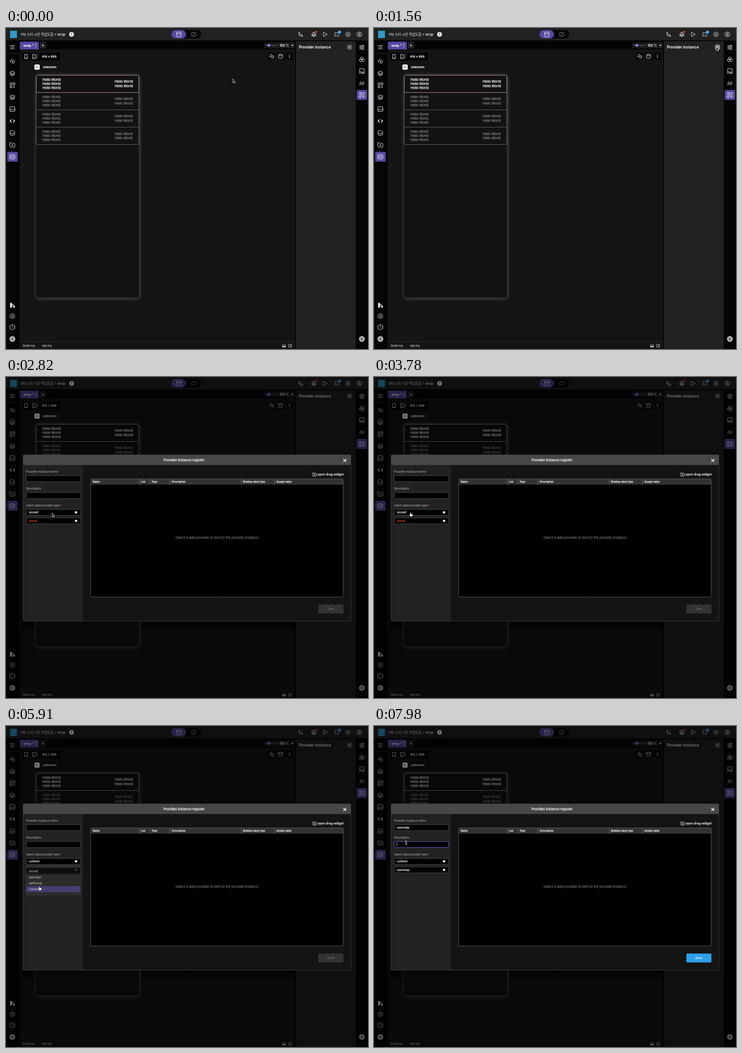
Animation, 795 px wide and 704 px high, one loop 8 s. Source, as an HTML page with a canvas:

```html
<!DOCTYPE html>
<html lang="ko">
<head>
<meta charset="utf-8">
<title>Provider instance register</title>
<style>
html, body { margin: 0; width: 795px; height: 704px; overflow: hidden; background: #141414; }
canvas { display: block; }
</style>
</head>
<body>
<canvas id="stage" width="795" height="704"></canvas>
<script>
const ctx = document.getElementById('stage').getContext('2d');
const LOOP = 8000;
const PURPLE = '#5849a0';
const PROVIDER = 'namutap';

// Eight soft teeth around a small hub
function gearPath() {
  const points = Array.from({ length: 48 }, (_, i) => {
    const angle = i * Math.PI / 24, r = 5.1 + 0.6 * Math.cos(angle * 8);
    return `${(r * Math.cos(angle)).toFixed(2)} ${(r * Math.sin(angle)).toFixed(2)}`;
  });
  return `M${points.join('L')}ZM1.8 0A1.8 1.8 0 1 1-1.8 0A1.8 1.8 0 1 1 1.8 0`;
}

// Icon outlines, centred on 0,0
const ICONS = {
  menu: 'M-5-3.5H5M-5 0H5M-5 3.5H5',
  shapes: 'M-5 1L-1.5-5L2 1ZM2-2A3.3 3.3 0 1 1-1 3',
  layers: 'M0-5L5.5-2L0 1L-5.5-2ZM-5.5 .5L0 3.5L5.5 .5M-5.5 2.7L0 5.7L5.5 2.7',
  widgets: 'M-5-5H-1V-1H-5ZM1.5-5H5.5V-1H1.5ZM-5 1.5H-1V5.5H-5ZM1.5 2H5.5M1.5 5H5.5',
  image: 'M-5.5-3.5Q-5.5-5-4-5H4Q5.5-5 5.5-3.5V3.5Q5.5 5 4 5H-4Q-5.5 5-5.5 3.5ZM-5 4L-1.5 0L1 2L3 0L5.5 3M-3-2.3h1',
  code: 'M-2-3L-5 0L-2 3M2-3L5 0L2 3',
  imageEdit: 'M1-5H-3Q-5-5-5-3V3Q-5 5-3 5H3Q5 5 5 3V0M-4 2L-1 0L2 2L5-1M2-3L3.5-1.5L6-5',
  folder: 'M-5.5-4.5H-2L-.5-3H4Q5.5-3 5.5-1.5V3.5Q5.5 5 4 5H-4Q-5.5 5-5.5 3.5ZM-1.5 0V1L0 2.5L1.5 1V0Z',
  table: 'M-5.5-3Q-5.5-5-3.5-5H3.5Q5.5-5 5.5-3V3Q5.5 5 3.5 5H-3.5Q-5.5 5-5.5 3ZM-5.5-1.5H5.5M-5.5 1.8H5.5M-2-3.2h.5M1.5-3.2h.5M-2 .2h.5M1.5 .2h.5M-2 3.3h.5M1.5 3.3h.5',
  gear: gearPath(),
  alert: 'M0-6L5.3-3V3L0 6L-5.3 3V-3ZM0-3V.7M0 2.3V3',
  sliders: 'M-5.5-3.5H1M4-3.5H5.5M1-3.5a1.5 1.5 0 1 0 3 0a1.5 1.5 0 1 0-3 0M-5.5 0H-4M-1 0H5.5M-4 0a1.5 1.5 0 1 0 3 0a1.5 1.5 0 1 0-3 0M-5.5 3.5H0M3 3.5H5.5M0 3.5a1.5 1.5 0 1 0 3 0a1.5 1.5 0 1 0-3 0',
  rings: 'M-3-2a3 3 0 1 0 6 0a3 3 0 1 0-6 0M-5.5 2a3 3 0 1 0 6 0a3 3 0 1 0-6 0M-.5 2a3 3 0 1 0 6 0a3 3 0 1 0-6 0',
  doc: 'M-5 0V-4Q-5-5.5-3.5-5.5H3.5Q5-5.5 5-4V3.5Q5 5.5 3 5.5M2 5.5V3.5H5',
  server: 'M-5.5-5H5.5V-1H-5.5ZM-3.5-3H0M3-3h.5M0 1.5H-5.5V5.5H0M-3.5 3.5H-1M2.5 5.5V1L1 2.5M4.5 1V5.5L6 4',
  branch: 'M-5-3.5a1.5 1.5 0 1 0 3 0a1.5 1.5 0 1 0-3 0M2 3.5a1.5 1.5 0 1 0 3 0a1.5 1.5 0 1 0-3 0M-3.5-2V1.5Q-3.5 3.5-1.5 3.5H2M-3.5 0H1Q3.5 0 3.5 2',
  bug: 'M-3-1.5Q-3-4 0-4Q3-4 3-1.5V2Q3 5 0 5Q-3 5-3 2ZM-2-6L-1-4M2-6L1-4M-5.5-2L-3-1M5.5-2L3-1M-6 1.2H6M-5.5 5L-3 3M5.5 5L3 3M0-1V5',
  play: 'M-4-5L5 0L-4 5Z',
  cast: 'M-4-2V-4H5V4H2M-5 0Q0 0 0 5M-5 2.5Q-2.5 2.5-2.5 5M-5 5h.3',
  user: 'M-5.5 0a5.5 5.5 0 1 0 11 0a5.5 5.5 0 1 0-11 0M-2-1.2a2 2 0 1 0 4 0a2 2 0 1 0-4 0M-3.7 4Q0 0 3.7 4',
  grid: 'M-5-3.5Q-5-5-3.5-5H3.5Q5-5 5-3.5V3.5Q5 5 3.5 5H-3.5Q-5 5-5 3.5ZM-5-1.5H5M-2.5-3.3h1M1.5-3.3h1M-2 1.7h.7M1.3 1.7h.7',
  link: 'M-1 1.5Q-5 2.5-5-1.5Q-4-5-1-4.5Q2-4 1.5-1M1-1.5Q5-2.5 5 1.5Q4 5 1 4.5Q-2 4-1.5 1M3-5Q5-5 5-3M-3 5Q-5 5-5 3',
  phone: 'M-3-4.5H3V4.5H-3ZM-1 3H1',
  phones: 'M-4.5-4.5H1V4.5H-4.5ZM3-4.5Q5-4.5 5-2V2Q5 4.5 3 4.5M-2.5 3H-1',
  plus: 'M-2 0H2M0-2V2',
  close: 'M-3.3-3.3L3.3 3.3M3.3-3.3L-3.3 3.3',
  expand: 'M-3.5-3H3.5V3H-3.5ZM-1.5 1.2L1.5-1.2M.2-1.2H1.5V0',
  chevron: 'M-1.2-2.5L1.5 0L-1.2 2.5Z',
  shield: 'M-2.5-2.2H2.5V.3Q2.3 1.6 0 2.8Q-2.3 1.6-2.5 .3Z',
  swatch: 'M-5-5H-1V5H-5ZM0-3.5L3-1L0 3ZM1.5 3.2L3.5 1H5.5V5H0Z',
  arrow: 'M0 0V9.2L2.1 7.3L3.5 10.4L5 9.7L3.6 6.7H6.3Z',
  hand: 'M-1 .6Q0-.6 1 .6V3L4.3 3.8Q5.2 4.2 5 5.6L4.3 9H-.4L-3.2 5.8Q-3.3 4.6-1 5.7Z',
  beam: 'M-2-4Q0-4 0-2.5V2.5Q0 4-2 4M2-4Q0-4 0-2.5M0 2.5Q0 4 2 4M-1 1H1'
};
for (const name in ICONS) ICONS[name] = new Path2D(ICONS[name]);

function icon(name, x, y, { stroke = '#eee', fill, width = 1, scale = 1 } = {}) {
  ctx.save();
  ctx.translate(x, y);
  ctx.scale(scale, scale);
  ctx.lineJoin = 'round';
  ctx.lineWidth = width;
  if (fill) { ctx.fillStyle = fill; ctx.fill(ICONS[name]); }
  if (stroke) { ctx.strokeStyle = stroke; ctx.stroke(ICONS[name]); }
  ctx.restore();
}

function box(x, y, w, h, fill, radius = 0, stroke) {
  ctx.beginPath();
  ctx.roundRect(x, y, w, h, radius);
  if (fill) { ctx.fillStyle = fill; ctx.fill(); }
  if (stroke) { ctx.strokeStyle = stroke; ctx.lineWidth = 1; ctx.stroke(); }
}

const dot = (x, y, r, fill) => box(x - r, y - r, r * 2, r * 2, fill, r);

// y is the middle of the capitals
function text(str, x, y, size, weight = 400, color = '#fff', align = 'left') {
  ctx.font = `${weight} ${size}px Inter, "Noto Sans CJK KR", sans-serif`;
  ctx.letterSpacing = `${-0.02 * size}px`;
  ctx.textAlign = align;
  ctx.fillStyle = color;
  ctx.fillText(str, x, y + size * 0.36);
}

const kebab = (x, y) => [-3, 0, 3].forEach(d => dot(x, y + d, 0.9, '#fff'));

function drawTopBar() {
  box(0, 0, 795, 27, '#212121');
  box(9, 6, 15, 16, '#2e9bc9', 1);
  text('HV 소미 시안 작업모음 > wrap', 33, 14, 7.6, 500, '#eee');
  dot(144, 14, 5.2, '#fff');
  text('!', 144, 14, 8, 800, '#222', 'center');
  box(363, 4.5, 65.5, 18.5, '#050505', 9.2);
  box(363, 4.5, 32.5, 18.5, PURPLE, 9.2);
  icon('grid', 379.5, 14);
  icon('link', 412, 14, { stroke: '#999' });
  ['branch', 'bug', 'play', 'cast', 'gear', 'user'].forEach((name, i) =>
    icon(name, [647, 676, 701, 726, 751, 776][i], 14, { scale: 0.95 }));
  dot(681.5, 8.5, 2.3, '#e5392f');
  dot(732.5, 9, 3.6, '#2196f3');
  text('1', 732.5, 9, 5, 600, '#fff', 'center');
}

function drawRails() {
  box(0, 28, 30, 676, '#050505');
  box(0, 0, 1, 704, '#2a2a2a');
  box(0, 55, 28, 1, '#333');
  box(2.8, 271.5, 23, 21.8, PURPLE, 3);
  ['menu', 'shapes', 'layers', 'widgets', 'layers', 'image', 'code', 'imageEdit', 'folder', 'table']
    .forEach((name, i) => icon(name, 14, i ? 47 + i * 26.15 : 42, { width: name === 'code' ? 1.6 : 1 }));
  icon('swatch', 14, 608, { fill: '#eee', stroke: null });
  icon('gear', 14, 632);
  icon('alert', 14, 656);

  box(768, 28, 27, 676, '#050505');
  box(770, 136, 23, 21.8, PURPLE, 3);
  ['sliders', 'rings', 'doc', null, 'server'].forEach((name, i) => name && icon(name, 781.5, 42.5 + i * 26.1));
  text('DS', 775.8, 98.2, 5.5, 700, '#eee');
  text('(x)', 781.5, 120.5, 9, 'italic 500', '#eee', 'center');
  for (const x of [14, 781.5]) {
    dot(x, 682, 6.5, '#aaa');
    icon('chevron', x, 682, { stroke: null, fill: '#111' });
  }
}

function drawPhone() {
  box(62.5, 80, 11.5, 11.5, '#fff', 2.5);
  icon('plus', 68, 85.7, { stroke: '#222', scale: 0.9 });
  text('unknown', 81, 85.5, 6.8, 700);
  ctx.save();
  ctx.shadowColor = 'rgba(255,255,255,.3)';
  ctx.shadowBlur = 9;
  ctx.shadowOffsetX = ctx.shadowOffsetY = 1;
  box(66, 103, 226, 488.5, '#121212', 5);
  ctx.restore();
  for (let row = 3; row >= 0; row--) {
    const y = 103 + row * 38.1, active = row === 0;
    const color = active ? '#fff' : '#8f8f8f', weight = active ? 600 : 500;
    box(66.5, Math.round(y) + 0.5, 225, 38, null, active ? [4, 4, 0, 0] : 0, active ? '#b59da1' : '#6e5c60');
    for (let i = 0; i < 3; i++) text('Hello World', 80, y + 10 + i * 9.25, 7.45, weight, color);
    for (let i = 0; i < 2; i++) text('Hello World', 238.7, y + 14.6 + i * 9.25, 7.45, weight, color);
  }
}

function drawWorkspace(pressed) {
  box(0, 0, 795, 704, '#050505');
  box(30, 47, 605, 657, '#141414');
  box(637, 29, 131, 675, '#212121');
  drawTopBar();
  drawRails();

  box(30.5, 30, 41.5, 17, PURPLE, [2, 2, 0, 0]);
  text('wrap *', 38, 38.3, 7.2, 'italic 700');
  kebab(65.5, 38.3);
  box(74, 31, 14, 14, '#242424', 3);
  icon('plus', 81, 38.3);
  box(567, 32, 68, 12, '#1b1b1b', 2);
  box(570, 37.5, 27, 1, '#777');
  box(570, 37.5, 8, 1, '#7c6be0');
  dot(577.5, 38, 3.1, '#8d7cf0');
  text('100 %', 600.8, 38, 7, 600);
  box(635, 29, 2, 675, '#050505');
  ctx.beginPath();
  ctx.moveTo(626.5, 37); ctx.lineTo(631, 37); ctx.lineTo(628.7, 40);
  ctx.fillStyle = '#fff';
  ctx.fill();

  box(35, 54, 84, 17.5, '#050505', 2);
  icon('phone', 44, 62.5);
  icon('phones', 63, 62.5);
  text('414 × 896', 79, 62.3, 6.85, 700);
  for (const x of [583.5, 603, 622.5]) box(x - 8, 54, 16, 16, '#050505', 2);
  icon('shapes', 583.5, 62);
  icon('grid', 603, 62, { scale: 0.9 });
  kebab(622.5, 62);

  drawPhone();

  box(30, 687, 605, 1, '#2c2c2c');
  text('Studio log', 36, 696.5, 5.95, 500, '#ccc');
  text('App log', 79, 696.5, 5.95, 500, '#ccc');
  box(607, 694, 7, 6, null, 1, '#999');
  box(607, 697, 7, 3, '#bbb');
  icon('expand', 624, 697, { stroke: '#aaa' });

  text('Provider instance', 643.3, 42.3, 8.65, 600);
  box(749, 36.5, 11, 11, pressed ? '#8a8a8a' : '#5c5c5c', 2.5);
  icon('plus', 754.5, 42, { stroke: '#bbb' });
}

function field(y, value, { color = '#fff', focused, select } = {}) {
  box(44.5, y + 0.5, 119, 13, '#000', 1, focused ? '#5a5ac0' : '#454545');
  text(value, 50, y + 6.8, 6.8, 600, color);
  if (select) icon('shield', 154, y + 7, { stroke: null, fill: '#fff' });
}

function label(str, y, required) {
  text(str, 44, y, 6.45, 400, '#b8b8b8');
  if (required) text('*', 44 + ctx.measureText(str).width + 0.5, y + 0.5, 6.5, 500, '#e04040');
}

function menu(y, h, opacity, drawItems) {
  if (opacity <= 0) return;
  ctx.save();
  ctx.globalAlpha *= opacity;
  box(44.5, y + 0.5, 119, h - 1, '#333', 1, '#4a4a4a');
  drawItems();
  ctx.restore();
}

function drawDialog(t, cursorY) {
  const chosen = t >= 7290, custom = t >= 5850;
  box(35, 536, 28, 16, 'rgba(0,0,0,.6)');
  box(297, 536, 338, 16, 'rgba(0,0,0,.6)');
  box(37.5, 170.5, 720, 365, '#141414', 2, '#383838');
  box(38, 171, 719, 22, '#474747', [2, 2, 0, 0]);
  box(38, 193, 131, 342, '#222');
  text('Provider instance register', 391, 182, 7.55, 600, '#fff', 'center');
  icon('close', 744, 183, { stroke: '#fff', width: 1.5 });

  label('Provider instance name', 207.7, true);
  field(216, chosen ? PROVIDER : '');
  label('Description', 244.7);
  field(253, '', { focused: t >= 7800 });
  if (t >= 7800) box(50, 255.5, 0.8, 8.5, '#ddd');
  label('Select data provider type', 281.7, true);
  field(290, custom ? 'custom' : 'socket', { select: true });
  field(308.5, chosen ? PROVIDER : 'unset', { select: true, color: chosen ? '#fff' : '#ee4438' });

  icon('folder', 678, 213.5, { scale: 0.75, width: 1.3 });
  text('open drag widget', 684.5, 213.5, 7, 600);
  box(186, 223.5, 554.5, 259, '#000', 1, '#5a5a5a');
  box(186.5, 224, 553.5, 12, '#333');
  [['Name', 190.5], ['List', 296.5], ['Type', 319.5], ['Description', 364], ['Binding value type', 520.5], ['Assign value', 593.5]]
    .forEach(([title, x], i) => {
      text(title, x, 230, 5.6, 700);
      if (i) box(Math.round(x) - 4.5, 224, 1, 12, '#777');
    });
  text('Select a data provider to bind to the provider instance', 463, 352.5, 7.5, 400, '#8a8a8a', 'center');
  box(686, 499, 55, 19.5, chosen ? '#2c9fea' : '#333', 1.5);
  text('Save', 713.3, 508.7, 6.95, 500, chosen ? '#fff' : '#707070', 'center');

  menu(306, 65, Math.min(ramp(t, 3870, 150), 1 - ramp(t, 5850, 150)), () => {
    ['socket', 'openApi', 'apiGroup', 'custom'].forEach((name, i) => {
      const y = 312 + i * 13.1;
      const hovered = cursorY >= y && cursorY < y + 13.1;
      if (hovered || i === 0) box(44.5, y, 119, 13.1, hovered ? PURPLE : '#000');
      text(name, 50, y + 6.6, 6.8, 600);
    });
  });
  menu(324, 26, Math.min(ramp(t, 6420, 150), 1 - ramp(t, 7290, 150)), () => {
    if (cursorY > 330) box(44.5, 330.5, 119, 13.1, PURPLE);
    text(PROVIDER, 50, 337, 6.8, 600);
  });
}

const ramp = (t, start, length) => Math.min(1, Math.max(0, (t - start) / length));

// Pointer stops: time, x, y
const TRACK = [
  [0, 498, 112], [30, 498, 112], [420, 650, 72], [810, 755, 44], [900, 752.5, 41], [1560, 752.5, 41],
  [1950, 463, 169], [2180, 357, 215], [2600, 130, 292], [2970, 82, 302], [3780, 80, 297], [4290, 80, 297],
  [4710, 74, 342], [5070, 73, 354], [5880, 73, 354], [6360, 77, 316], [6600, 77, 318.5], [6840, 77, 318.5],
  [7080, 74, 335], [7260, 74, 335], [7680, 70.5, 256], [8000, 70.5, 256]
];

function pointer(t) {
  const i = TRACK.findIndex(stop => stop[0] > t);
  const [t0, x0, y0] = TRACK[i - 1], [t1, x1, y1] = TRACK[i];
  const k = (t - t0) / (t1 - t0);
  return [x0 + (x1 - x0) * k, y0 + (y1 - y0) * k];
}

function drawPointer(t, x, y) {
  if (t >= 7600) {
    icon('beam', x, y, { stroke: '#000', width: 2.4 });
    icon('beam', x, y, { stroke: '#fff' });
  } else if ((t > 2850 && t < 6000) || (t > 6960 && t < 7380)) {
    icon('hand', x, y, { stroke: '#222', fill: '#fff', width: 0.8 });
  } else {
    icon('arrow', x, y, { stroke: '#fff', fill: '#000', width: 0.9, scale: 0.88 });
  }
}

function draw(t) {
  const [x, y] = pointer(t);
  const open = ramp(t, 1590, 150);
  drawWorkspace(t >= 1380 && t < 1650);
  if (open > 0) {
    box(0, 0, 795, 704, `rgba(0,0,0,${0.55 * open})`);
    ctx.globalAlpha = open;
    drawDialog(t, y);
    ctx.globalAlpha = 1;
  }
  drawPointer(t, x, y);
}

function tick() {
  draw(performance.now() % LOOP);
  requestAnimationFrame(tick);
}
tick();
</script>
</body>
</html>
```
